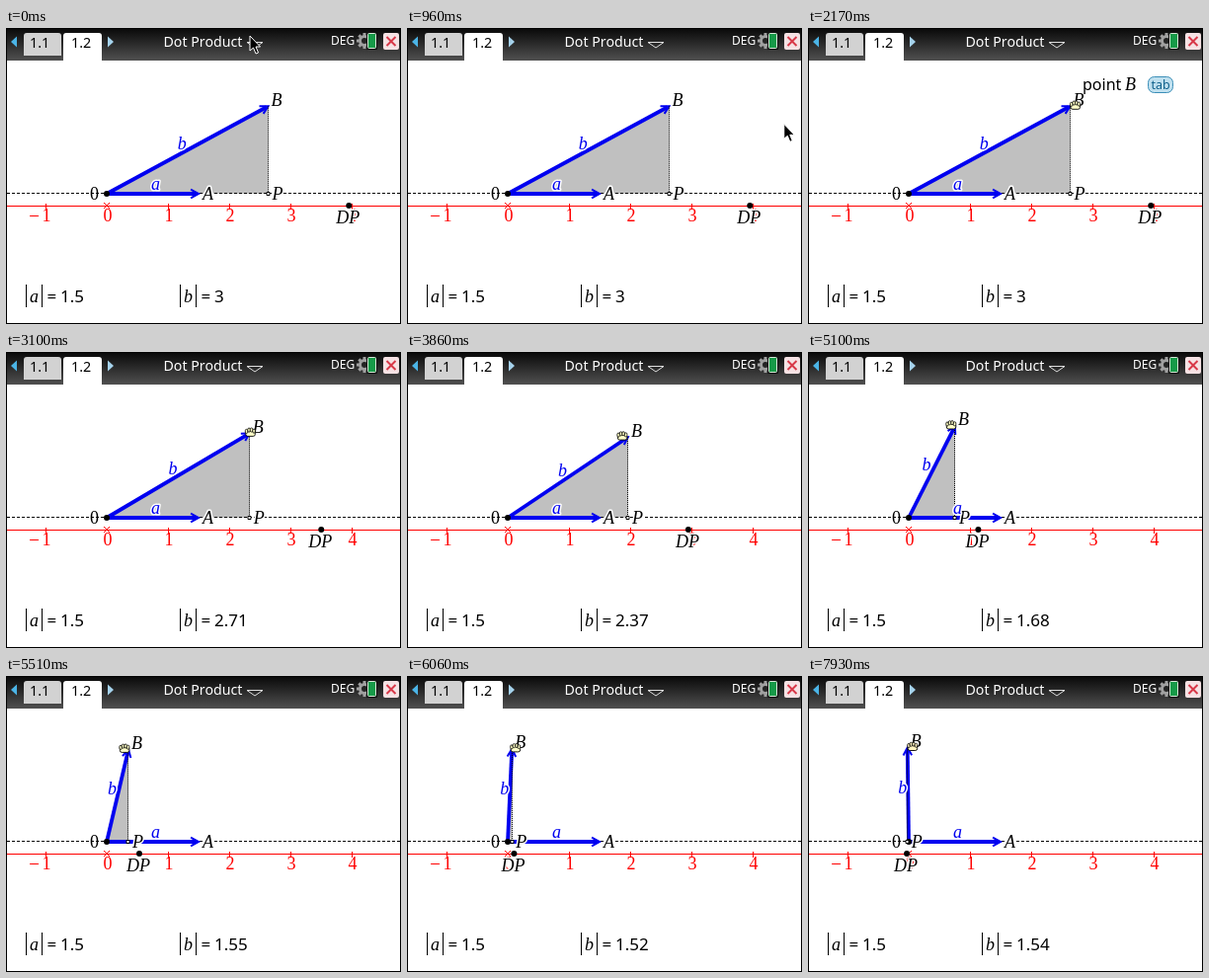
Animation of 400 by 300 pixels, one loop 8000 ms. Source, as an HTML page with a canvas:

```html
<!DOCTYPE html>
<html lang="en">
<head>
<meta charset="utf-8">
<title>Dot Product</title>
<style>
html, body { margin: 0; width: 100%; height: 100%; overflow: hidden; background: #fff; }
canvas { display: block; }
</style>
</head>
<body>
<canvas id="stage" width="400" height="300"></canvas>
<script>
const ctx = document.getElementById('stage').getContext('2d');
const LOOP = 8000, UNIT = 62, OX = 102, OY = 168, AXIS = 180;
const HOVER = 1310, GRAB = 2170, DRAG = 2480, RELEASE = 6650;
const BLUE = '#0000f0', RED = '#ff0000';
const SANS = '"Noto Sans", "Open Sans", sans-serif';
const SERIF = '"Liberation Serif", serif';
const ITALIC = `italic 18px ${SERIF}`;

// Key positions of B: time, distance right of O, height above O
const PATH = [
  [DRAG, 163.5, 88.7], [3860, 122, 81.9], [4340, 86.7, 84.6], [5100, 47, 93],
  [5790, 5, 94], [6060, 4.3, 94.1], [6580, -1.3, 95.5]
];

function pose(t) {
  const i = PATH.findIndex(key => t < key[0]);
  if (i < 1) return PATH.at(i).slice(1);
  const [t0, x0, y0] = PATH[i - 1], [t1, x1, y1] = PATH[i];
  const k = (t - t0) / (t1 - t0);
  return [x0 + (x1 - x0) * k, y0 + (y1 - y0) * k];
}

function trace(points, closed) {
  ctx.beginPath();
  points.forEach(([x, y]) => ctx.lineTo(x, y));
  if (closed) ctx.closePath();
}

function paint(fill, stroke, width = 1) {
  ctx.lineWidth = width;
  if (fill) { ctx.fillStyle = fill; ctx.fill(); }
  if (stroke) { ctx.strokeStyle = stroke; ctx.stroke(); }
}

function line(points, color, width = 1, dash = []) {
  trace(points);
  ctx.setLineDash(dash);
  paint(null, color, width);
  ctx.setLineDash([]);
}

function shape(points, fill, stroke) {
  trace(points, true);
  paint(fill, stroke);
}

function box(x, y, w, h, r, fill, stroke, width) {
  ctx.beginPath();
  ctx.roundRect(x, y, w, h, r);
  paint(fill, stroke, width);
}

function dot(x, y, r, fill, stroke, width) {
  ctx.beginPath();
  ctx.arc(x, y, r, 0, 2 * Math.PI);
  paint(fill, stroke, width);
}

function text(str, x, y, font, color = '#000', align = 'left') {
  ctx.font = font;
  ctx.fillStyle = color;
  ctx.textAlign = align;
  ctx.fillText(str, x, y);
}

// Italic name with a white halo
function label(str, x, y, color) {
  ctx.font = ITALIC;
  ctx.textAlign = 'left';
  ctx.lineJoin = 'round';
  ctx.strokeStyle = '#fff';
  ctx.lineWidth = 3;
  ctx.strokeText(str, x, y);
  ctx.lineJoin = 'miter';
  text(str, x, y, ITALIC, color);
}

function vector(x, y) {
  const a = Math.atan2(y - OY, x - OX);
  const back = (d, turn = 0) => [x - d * Math.cos(a + turn), y - d * Math.sin(a + turn)];
  line([[OX, OY], back(2)], BLUE, 3.8);
  line([back(9, 0.5), [x, y], back(9, -0.5)], BLUE, 2);
}

function cross(x, y, r, color, width) {
  line([[x - r, y - r], [x + r, y + r]], color, width);
  line([[x + r, y - r], [x - r, y + r]], color, width);
}

function header() {
  const shade = ctx.createLinearGradient(0, 0, 0, 33);
  shade.addColorStop(0, '#080808');
  shade.addColorStop(1, '#505050');
  ctx.fillStyle = shade;
  ctx.fillRect(0, 0, 400, 33);
  shape([[5, 14], [11, 8.5], [11, 19.5]], '#4bb4e6');
  shape([[109, 14], [103, 8.5], [103, 19.5]], '#a5d2ec');
  box(18, 5, 38, 23, [3, 3, 0, 0], '#d2d2d2');
  box(58, 5, 39, 29, [3, 3, 0, 0], '#fff');
  text('1.1', 24, 20, `14.3px ${SANS}`);
  text('1.2', 66, 20, `14.3px ${SANS}`);
  text('Dot Product', 159.5, 19, `14.2px ${SANS}`, '#fff');
  shape([[244, 14.5], [260, 14.5], [252, 20]], null, '#ddd');
  text('DEG', 329, 17, `12px ${SANS}`, '#fff');

  for (let a = 0; a < 6; a += Math.PI / 4) {
    const c = Math.cos(a), s = Math.sin(a);
    line([[363 + 4 * c, 13 + 4 * s], [363 + 8 * c, 13 + 8 * s]], '#a0a0a0', 3);
  }
  dot(363, 13, 4.5, null, '#a0a0a0', 3);
  box(365, 4, 11, 18, 1, '#111');
  box(366.5, 5.5, 8, 15, 1, '#169a48', '#d8e8d8');
  box(382, 5, 16, 17, 2, '#f6e2e4');
  cross(390, 13.5, 4.5, '#d83848', 2);
}

function axis() {
  line([[1, AXIS + 0.5], [399, AXIS + 0.5]], RED);
  for (let n = -1; n <= 4; n++) {
    const x = OX + n * UNIT;
    if (n) line([[x + 0.5, 178], [x + 0.5, 184]], RED);
    text(Math.abs(n), x + 1, 196, `18px ${SERIF}`, RED, 'center');
  }
  cross(OX, AXIS, 3, RED);
  line([[24, 190.5], [33, 190.5]], RED);
}

function norm(name, value, x) {
  for (const bar of [x + 0.5, x + 16.5]) line([[bar, 260], [bar, 283]], '#000');
  text(name, x + 4, 278, ITALIC);
  text('=', x + 21.5, 278, `17px ${SANS}`);
  text(value, x + 35, 278, `17px ${SANS}`);
}

function arrow(x, y) {
  const outline = [[0, 0], [0, 15], [3.5, 12], [6, 18], [8.5, 17], [6, 11], [10.5, 11]];
  shape(outline.map(([a, b]) => [x + a, y + b]), '#000', '#fff');
}

// Four fingers over a palm; reach 0 is a closed fist
function hand(x, y, reach, fill) {
  box(x - 4.5, y - 1, 9.5, 5.5 + reach, 2, fill, '#000', 0.9);
  for (let i = 0; i < 4; i++) {
    const top = y - 2.5 - reach - 1.5 * Math.sin(i);
    box(x - 5 + 2.5 * i, top, 2.5, 4 + reach, 1.2, fill, '#000', 0.8);
  }
}

function tooltip() {
  text('point', 278, 63, `16px ${SANS}`);
  text('B', 321, 63, ITALIC);
  box(344.5, 49.5, 25, 16, 6, '#bfe0ef', '#3c8fb8');
  text('tab', 357, 62, `12.5px ${SANS}`, '#0d5f8a', 'center');
}

function cursor(t, by) {
  if (t < HOVER) {
    // Swings out to the right, then back to B
    const k = Math.max(0, (t - 550) / (HOVER - 550));
    const swing = Math.sin(Math.PI * k);
    arrow(247 + 20 * k + 125 * swing, 8 + 66 * k + 100 * k * swing);
  } else if (t < GRAB) {
    hand(268.5, 80, 4, '#ffffe0');
  } else {
    // The hand runs a little ahead of the point it drags
    const [ahead] = pose(t + 150);
    hand(OX + ahead + 5, by - 1.5, 0, t < RELEASE ? '#ffffc8' : '#fff4c0');
  }
}

function draw(t) {
  const [dx, dy] = pose(t);
  const bx = OX + dx, by = OY - dy;
  const ax = OX + 1.5 * UNIT, dp = OX + 1.5 * dx;
  const px = Math.floor(bx) + 0.5;

  ctx.fillStyle = '#fff';
  ctx.fillRect(0, 0, 400, 300);
  header();

  shape([[OX, OY], [bx, by], [bx, OY]], '#c0c0c0');
  line([[1, 167.5], [399, 167.5]], '#000', 1, [3, 2]);
  axis();
  vector(ax, OY);
  vector(bx, by);
  line([[px, by], [px, OY]], '#000', 1, [1, 1]);

  label('A', 199, 174);
  label('P', bx + 4, 174);
  label('a', 147, 164, BLUE);
  label('b', (OX + bx) / 2 - 10, (OY + by) / 2 - 1, BLUE);
  label('B', bx + 3, by - 0.5);
  label('DP', dp - 13, 198);
  text('0', 85, 174, `18px ${SERIF}`);
  dot(OX, OY, 3, '#000');
  dot(dp, AXIS, 3, '#000');
  box(px - 1.5, 166.5, 3, 3, 0, '#fff', '#000');

  norm('a', 1.5, 20);
  norm('b', +(Math.hypot(dx, dy) / UNIT).toFixed(2), 176);

  if (t >= HOVER && t < DRAG) tooltip();
  cursor(t, by);
  box(0, 0, 400, 300, 0, null, '#000', 2);
}

function frame(now) {
  draw(now % LOOP);
  requestAnimationFrame(frame);
}
requestAnimationFrame(frame);
</script>
</body>
</html>
```
